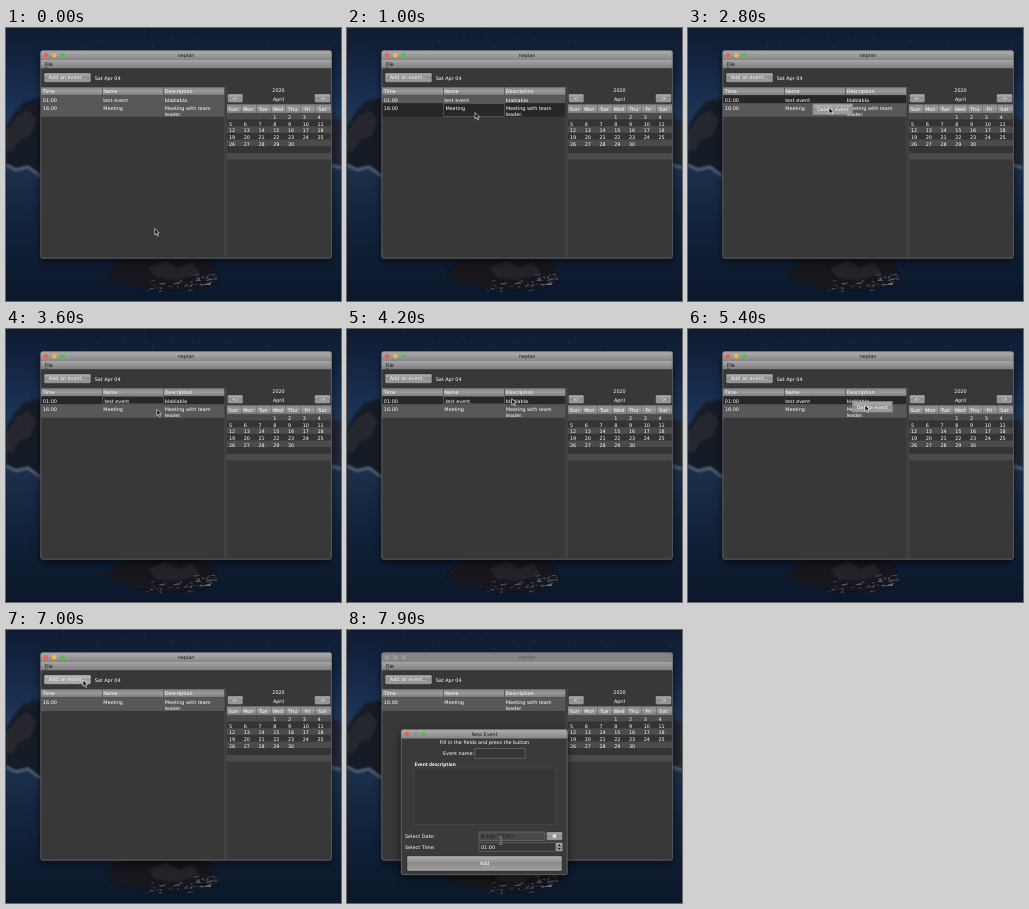
Write an HTML page that moves like this. It is 335x273 px and loops after 8 s.

```html
<!DOCTYPE html>
<html lang="en">
<head>
<meta charset="utf-8">
<title>neplan</title>
<style>
html, body { margin: 0; width: 100%; height: 100%; overflow: hidden; background: #0e1b30; }
svg { display: block; width: 335px; height: 273px; }
text { font: 4.9px "DejaVu Sans", sans-serif; fill: #fff; text-rendering: geometricPrecision; white-space: pre; }
.bold { font: bold 4.75px "Noto Sans", sans-serif; }
.window { filter: drop-shadow(0 3px 4px #0009); }
</style>
</head>
<body>
<svg viewBox="0 0 335 273">
  <defs>
    <linearGradient id="sky" x2="0" y2="1"><stop stop-color="#0f1b31"/><stop offset=".55" stop-color="#192f51"/><stop offset="1" stop-color="#2c425f"/></linearGradient>
    <linearGradient id="sea" x2="0" y2="1"><stop stop-color="#20344f"/><stop offset=".45" stop-color="#13243d"/><stop offset="1" stop-color="#0b172a"/></linearGradient>
    <linearGradient id="bar" x2="0" y2="1"><stop stop-color="#b0b0b0"/><stop offset="1" stop-color="#858585"/></linearGradient>
    <linearGradient id="menu" x2="0" y2="1"><stop stop-color="#a6a6a6"/><stop offset="1" stop-color="#7c7c7c"/></linearGradient>
    <linearGradient id="head" x2="0" y2="1"><stop stop-color="#848484"/><stop offset=".5" stop-color="#9a9a9a"/><stop offset="1" stop-color="#7a7a7a"/></linearGradient>
    <linearGradient id="button" x2="0" y2="1"><stop stop-color="#b2b2b2"/><stop offset=".5" stop-color="#8c8c8c"/><stop offset="1" stop-color="#a2a2a2"/></linearGradient>
    <linearGradient id="hover" x2="0" y2="1"><stop stop-color="#c4c4c4"/><stop offset=".5" stop-color="#9e9e9e"/><stop offset="1" stop-color="#b4b4b4"/></linearGradient>
    <filter id="soft"><feGaussianBlur stdDeviation=".8"/></filter>
  </defs>
  <rect width="335" height="125" fill="url(#sky)"/>
  <rect y="122" width="335" height="151" fill="url(#sea)"/>
  <g filter="url(#soft)">
    <path d="M0 98L9 84 18 74 28 71 45 70V150L32 146 22 138 10 141 0 136Z" fill="#151a25"/>
    <path d="M0 104L11 88 22 82 31 92 24 108 13 112 6 124 0 122Z" fill="#27272f"/>
    <path d="M0 137L10 142 22 139 34 148" fill="none" stroke="#56667a" stroke-width="2.500"/>
    <path d="M320 88L335 92V138L320 134Z" fill="#232631"/>
    <path d="M320 136L335 140" stroke="#56667a" stroke-width="2.500"/>
    <path d="M98 246L110 236 128 226H196L208 240 212 254 190 261 150 262 112 255Z" fill="#14161e"/>
    <path d="M142 240L160 232 172 240 186 234 194 246 170 252 150 250Z" fill="#25232a"/>
  </g>
  <g id="specks"></g>
  <g id="stage"></g>
</svg>
<script>
const LOOP = 8000;
const stage = document.getElementById('stage');

const rect = (x, y, w, h, fill, extra = '') =>
  `<rect x="${x}" y="${y}" width="${w}" height="${h}" fill="${fill}" ${extra}/>`;
const label = (x, y, text, extra = '') => `<text x="${x}" y="${y}" ${extra}>${text}</text>`;
const centered = (x, y, text, fill = '#fff') =>
  label(x, y, text, `text-anchor="middle" style="fill:${fill}"`);
const button = (x, y, w, h, text, fill = 'url(#button)') =>
  rect(x, y, w, h, fill, 'rx="1.4" stroke="#2a2a2a" stroke-width=".4"') +
  centered(x + w / 2, y + h / 2 + 1.7, text);
const field = (x, y, w, h, fill = '#363636') =>
  rect(x, y, w, h, fill, 'stroke="#777" stroke-width=".6"');
const lights = (x, y, colors) =>
  colors.map((c, i) => `<circle cx="${x + i * 8.3}" cy="${y}" r="2.3" fill="${c}"/>`).join('');
const frame = (x, y, w, h, fill) =>
  `<g class="window">${rect(x, y, w, h, fill, 'rx="2"')}</g>`;
const outline = (x, y, w, h) =>
  rect(x, y, w, h, 'none', 'rx="2" stroke="#777" stroke-width=".6"');

// Foam around the rock and faint stars, scattered by a seeded generator
function specks() {
  let seed = 7;
  const random = () => (seed = seed * 16807 % 2147483647) / 2147483647;
  let s = '';
  for (let i = 0; i < 60; i++) {
    const x = 140 + random() * 68, y = 252 + random() * 11 - (x > 185 ? 6 : 0);
    s += rect(x, y, 1 + random() * 4, .8, '#9aa8b8', `opacity="${.2 + random() * .5}"`);
  }
  for (let i = 0; i < 14; i++)
    s += rect(random() * 335, random() * 21, .8, .8, '#9fb0c8', 'opacity=".4"');
  return s;
}

function calendar() {
  let s = centered(272.5, 64, '2020') + centered(272.5, 72.7, 'April') +
    button(221.5, 66, 15.5, 8.4, '&lt;-') + button(308.5, 66, 16, 8.4, '-&gt;') +
    rect(221, 76.3, 104, 8.7, 'url(#head)');
  for (let r = 0; r < 7; r++)
    s += rect(221, 85 + r * 6.65, 104, 6.65, r % 2 ? '#343434' : '#4b4b4b');
  'Sun Mon Tue Wed Thu Fri Sat'.split(' ').forEach((day, i) => {
    s += centered(227.5 + i * 14.8, 82.6, day);
    if (i) s += rect(220.5 + i * 14.8, 76.5, .4, 8.3, '#444');
  });
  for (let d = 1; d <= 30; d++) {
    const cell = d + 2;
    s += label(223 + cell % 7 * 14.75, 91 + Math.floor(cell / 7) * 6.65, d);
  }
  return s;
}

const columns = [36.8, 97.2, 158.7];
const events = [
  { h: 7.9, cells: ['01:00', 'test event', 'blablabla'] },
  { h: 13.6, cells: ['16:00', 'Meeting', 'Meeting with team', 'leader.'] }
];

function table({ rows, selected, focused }) {
  let y = 67.3;
  let s = rect(35, 59.3, 183.5, 8, 'url(#head)') + rect(96, 59.5, .6, 7.6, '#444') + rect(157.2, 59.5, .6, 7.6, '#444');
  ['Time', 'Name', 'Description'].forEach((name, i) => s += label(columns[i], 65.3, name));
  for (const r of rows) {
    const { h, cells } = events[r], on = r === selected;
    s += rect(35, y, 183.5, h, on ? '#272727' : '#585858');
    if (on && focused) s += rect(96.6, y + .3, 60.8, h - .6, 'none', 'stroke="#6d6d6d" stroke-width=".6"');
    cells.forEach((text, i) => {
      const x = columns[Math.min(i, 2)] + (on && focused && i === 1 ? 1.2 : 0);
      s += label(x, y + (i === 3 ? 12.7 : 6.6), text);
    });
    y += h;
  }
  return s;
}

function mainWindow(state) {
  const { dialog, hover } = state;
  return frame(34.5, 22.6, 291.2, 207.9, '#383838') +
    `<path d="M34.5 32V24.600q0-2 2-2H323.700q2 0 2 2V32Z" fill="${dialog ? '#858585' : 'url(#bar)'}"/>` +
    lights(40, 27.3, dialog ? ['#999', '#999', '#999'] : ['#f45b52', '#f1b93b', '#4fc04a']) +
    centered(180, 29.1, 'neplan', dialog ? '#5a5a5a' : '#1c1c1c') +
    rect(34.5, 32, 291.2, 8.6, 'url(#menu)') +
    label(38.7, 38.2, 'File', 'style="fill:#111"') + rect(38.8, 38.9, 2.8, .45, '#111') +
    rect(34.5, 40.6, 291.2, .5, '#272727') +
    button(38, 45, 47, 9.2, 'Add an event...', hover ? 'url(#hover)' : 'url(#button)') +
    label(88.7, 51.5, 'Sat Apr 04') +
    table(state) + rect(218.5, 58.5, 2, 171.5, '#505050') + rect(219.3, 58.5, .5, 171.5, '#262626') +
    calendar() + outline(34.8, 22.9, 290.6, 207.3);
}

function dialogWindow() {
  return frame(54, 99.4, 166.5, 145.6, '#3a3a3a') +
    '<path d="M54 108.5V101.4q0-2 2-2H218.5q2 0 2 2V108.5Z" fill="url(#bar)"/>' +
    lights(60, 104, ['#f45b52', '#929292', '#4fc04a']) + centered(137.5, 105.8, 'New Event', '#1c1c1c') +
    centered(137.5, 114.3, 'Fill in the fields and press the button') +
    label(96, 125.3, 'Event name:') + field(128, 118.5, 50, 9.7) +
    label(67.5, 136.2, 'Event description', 'class="bold"') +
    rect(67, 138, 142, 56.5, '#363636', 'stroke="#505050" stroke-width=".5"') +
    label(58, 207.8, 'Select Date:') + field(132, 202, 66, 8.3, '#484848') +
    label(134, 207.9, '4 апр. 2020 г.', 'style="fill:#1d1d1d"') +
    button(199.5, 202, 16, 8.3, '') + rect(205.7, 204.6, 3.6, 3, '#e8e8e8') +
    label(58, 218.7, 'Select Time:') + field(132, 212.8, 76.5, 8.4) + label(134, 218.8, '01:00') +
    rect(209, 212.8, 6.5, 8.4, 'url(#button)', 'rx="1"') +
    '<path d="M210.7 216L212.25 214 213.8 216ZM210.7 218L212.25 220 213.8 218Z" fill="#222"/>' +
    button(60, 226, 155, 15, 'Add') + outline(54.3, 99.7, 165.9, 145);
}

const popup = (x, y) =>
  rect(x, y, 39.5, 10.4, '#858585', 'stroke="#aaa" stroke-width=".5"') +
  rect(x + .8, y + .8, 37.9, 8.8, 'url(#button)') + centered(x + 19.8, y + 6.9, 'Delete event');

// Pointer path: time, x, y
const path = [
  [0, 148.7, 200.5], [300, 148.7, 200.5], [900, 128, 84.5], [1100, 128, 84.5],
  [1600, 122, 71], [2200, 125, 75.8], [2800, 141, 79.5], [3300, 146, 84],
  [4200, 164.7, 69.5], [4600, 165, 73], [5400, 177, 76], [5800, 177, 76],
  [6100, 140, 67], [6200, 140, 67], [6600, 77, 50], [7100, 77, 50], [7700, 153, 209], [7900, 153.7, 210.5]
];

function pointer(t) {
  const i = path.findIndex(p => p[0] >= t);
  if (i <= 0) return path[0].slice(1);
  const [t0, x0, y0] = path[i - 1], [t1, x1, y1] = path[i];
  const u = (t - t0) / (t1 - t0), k = u * u * (3 - 2 * u);
  return [x0 + (x1 - x0) * k, y0 + (y1 - y0) * k];
}

const beamPath = 'M-1.5-3.5Q0-3.5 0-2.5 0-3.5 1.5-3.5M0-2.5V2.5M-1.5 3.5Q0 3.5 0 2.5 0 3.5 1.5 3.5';
const stroke = (color, width) =>
  `<path d="${beamPath}" fill="none" stroke="${color}" stroke-width="${width}"/>`;

function cursor([x, y], beam) {
  const shape = beam
    ? stroke('#ddd', 1.3) + stroke('#111', .7)
    : '<path d="M0 0V6.3L1.5 4.9 2.6 7.5 3.7 7 2.6 4.5H4.5Z" fill="#080808" stroke="#f4f4f4" stroke-width=".65"/>';
  return `<g transform="translate(${x} ${y})">${shape}</g>`;
}

function draw(t) {
  const between = (a, b) => t >= a && t < b;
  const firstMenu = between(2300, 3300), secondMenu = between(4700, 5500);
  const dialog = t >= 7200;
  const at = pointer(t);
  stage.innerHTML = mainWindow({
    rows: t < 5500 ? [0, 1] : [1],
    selected: t < 900 || t >= 5500 ? -1 : t < 1700 ? 1 : 0,
    focused: !firstMenu && !secondMenu,
    hover: between(6500, 7200),
    dialog
  }) +
    (firstMenu ? popup(125, 76) : '') + (secondMenu ? popup(164.7, 72.6) : '') +
    (dialog ? dialogWindow() : '') +
    cursor(at, dialog && at[1] > 202);
}

document.getElementById('specks').innerHTML = specks();
let last = -1;
function tick() {
  const t = Math.floor(performance.now() % LOOP / 100) * 100;
  if (t !== last) draw(last = t);
  requestAnimationFrame(tick);
}
tick();
</script>
</body>
</html>
```
